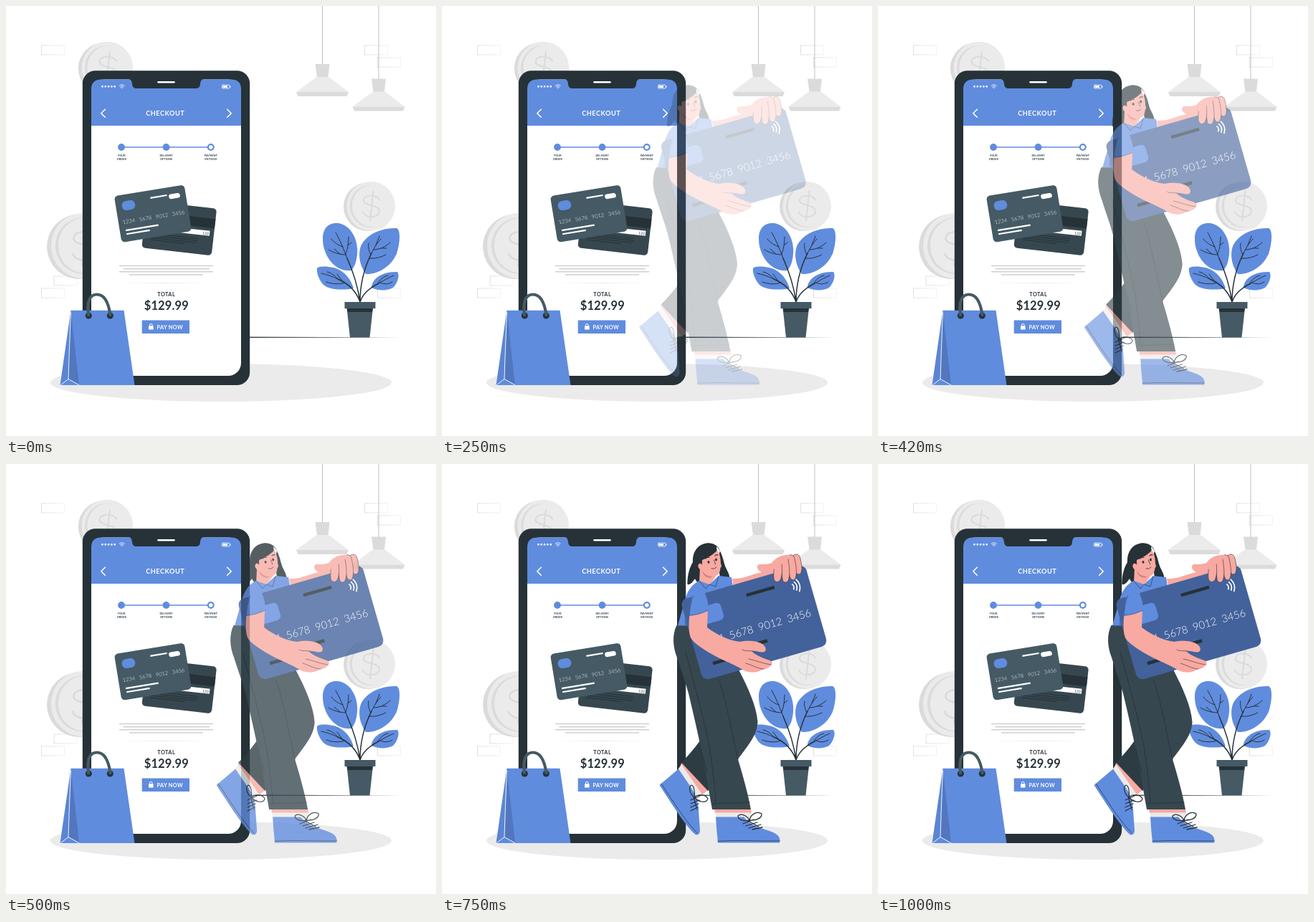
An HTML page for the animation above (1040 ms loop, 600x600 px).

```html
<!DOCTYPE html>
<html lang="en">
<head>
<meta charset="utf-8">
<title>Checkout</title>
<style>
  html, body { margin: 0; width: 100%; height: 100%; overflow: hidden; background: #fff; }
  svg { display: block; width: 100vw; height: 100vh; }
  text { font-family: Lato, sans-serif; }
  .mid { text-anchor: middle; }
  .b { font-weight: 700; }
  .blue { fill: #608cde; }
  .dark { fill: #263238; }
  .pants { fill: #37474f; }
  .slate { fill: #455a64; }
  .pale { fill: #ebebeb; }
  .grey { fill: #dbdbdb; }
  .white { fill: #fff; }
  .skin { fill: #f8a9a1; }
  .line { fill: none; stroke: #263238; stroke-linecap: round; stroke-linejoin: round; }
  .wline { fill: none; stroke: #fff; stroke-linecap: round; stroke-linejoin: round; }
  .label { font-size: 3.6px; letter-spacing: .2px; }
</style>
</head>
<body>
<svg viewBox="0 0 600 600" xmlns="http://www.w3.org/2000/svg">
  <defs>
    <linearGradient id="fade">
      <stop stop-color="#dcdcdc"/><stop offset="1" stop-color="#f2f2f2"/>
    </linearGradient>
    <rect id="brick" width="32" height="13" fill="none" stroke="url(#fade)" stroke-width=".9"/>
    <g id="coin">
      <ellipse class="grey" cx="-2" cy=".6" rx="34" ry="34"/>
      <ellipse class="pale" cx="2.2" cy="-.3" rx="33.8" ry="34.3"/>
      <ellipse class="grey" cx="1.8" cy="-.3" rx="29" ry="29.5"/>
      <ellipse class="pale" cx="3.8" cy="-.6" rx="28" ry="29"/>
      <path d="M14 -9C11 -17 -8 -17 -8 -8C-8 0 14 -3 14 7C14 16 -5 18 -9 8M5.5 -21L1 20"
        fill="none" stroke="#dbdbdb" stroke-width="2" stroke-linecap="round"/>
    </g>
    <g id="lamp">
      <path d="M441.5 -30V82" stroke="#c4c4c4" stroke-width="1.1"/>
      <path class="pale" d="M434 98.5H449.5L478 120H405Z"/>
      <path class="grey" d="M431.5 81H451.5L449.5 99H434ZM405 120H478L475.5 126H407.5Z"/>
    </g>
  </defs>

  <g id="room">
    <use href="#brick" x="49.5" y="55"/><use href="#brick" x="500.5" y="55"/>
    <use href="#brick" x="518.5" y="72"/><use href="#brick" x="67" y="377"/>
    <use href="#brick" x="49.5" y="394"/><use href="#brick" x="518.5" y="394"/>
    <use href="#coin" transform="translate(139 86.5) scale(1.06)"/>
    <use href="#coin" transform="translate(105 335) scale(1.33)"/>
    <use href="#coin" transform="translate(507 279.5)"/>
    <use href="#lamp"/><use href="#lamp" x="78.5" y="20.5"/>
    <ellipse class="pale" cx="300" cy="525.5" rx="238" ry="26.5"/>
    <path class="dark" d="M76 462.300L313 461.500L551 462.300L313 463.100Z"/>
  </g>

  <g id="plant">
    <path class="blue" d="M482 369C459 372 442 348 442 325C442 308 452 302 463 303C481 305 492 326 490 346C489 358 486 364 482 369Z
      M502 374C494 363 490 346 496 333C504 318 525 309 545 310C551 312 550 331 545 346C536 366 516 375 502 374Z
      M485 394C470 397 450 396 443 389C437 383 433 372 434 366C437 362 455 363 465 368C476 374 482 384 485 394Z
      M510 393C510 383 522 370 546 371C550 375 546 388 540 393C532 398 518 397 510 393Z"/>
    <path class="line" stroke-width="1.5" d="M494 413C491 392 485 372 476 352M494 413C494 390 500 365 510 345
      M494 413C488 396 477 387 463 381M494 413C498 401 508 393 520 387"/>
    <path class="line" stroke-width="1" d="M476 352C471 339 466 326 460 316M474 347C466 347 456 344 450 340M466 346L458 339
      M470 336C463 334 457 329 454 325M474 346C477 338 478 331 478 322M477 334L482 330
      M510 345C514 337 518 330 523 325M507 352C516 353 524 350 530 347M513 340C521 340 530 336 536 330M509 347C506 341 505 336 506 331M516 334C517 329 520 326 521 321M524 338L531 338
      M463 381C455 377 448 375 440 373M473 386C465 389 455 388 447 385M463 381C460 377 454 372 448 371M470 385L462 374
      M520 387C527 383 534 379 541 376M522 386C529 389 534 388 539 385M519 387C522 381 528 377 533 376"/>
    <path class="slate" d="M475.500 421H512L507.500 462.500H480Z"/>
    <path class="dark" d="M475.500 421H512L511 427H476.500Z"/>
    <rect class="slate" x="472.500" y="413" width="43" height="9"/>
  </g>

  <g id="phone">
    <rect class="dark" x="106.800" y="90.200" width="233.400" height="438.800" rx="18"/>
    <rect class="white" x="119" y="102.500" width="209" height="413.500" rx="18"/>
    <path class="blue" d="M119 167V116Q119 102.500 133 102.500H314Q328 102.500 328 116V167Z"/>
    <path class="dark" d="M171 102C175 102.500 175.500 105 176 109Q176.500 115 182 115H265Q270.500 115 271 109C271.500 105 272 102.500 276 102Z"/>
    <path class="wline" stroke-width="2.500" d="M212.500 106.200H234.500"/>
    <path class="wline" stroke-width="2.800" d="M134.500 112.300h0M138.800 112.300h0M143.100 112.300h0M147.400 112.300h0M151.700 112.300h0"/>
    <path class="wline" stroke-width=".9" d="M158.200 111.200Q161.700 108.300 165.200 111.200M159.600 112.900Q161.700 111.100 163.800 112.900M161.300 114.300h.8"/>
    <rect class="wline" x="301.500" y="110.200" width="10.500" height="4.800" rx="1" stroke-width=".8"/>
    <path class="white" d="M302.500 111.200h6.500v2.800h-6.500zM312.400 111.500h1v2.200h-1z"/>
    <path class="wline" stroke-width="1.600" d="M138.300 144.200L132.800 149.700L138.300 155.200M308.700 144.200L314.200 149.700L308.700 155.200"/>
    <text class="white b mid" x="222.200" y="153" font-size="9.200" letter-spacing=".5">CHECKOUT</text>

    <path d="M161 197H282" stroke="#608cde" stroke-width="1.300"/>
    <circle class="blue" cx="161" cy="197" r="4.900"/><circle class="blue" cx="223.500" cy="197" r="4.900"/>
    <circle cx="285.800" cy="197" r="3.900" fill="#fff" stroke="#608cde" stroke-width="2.200"/>
    <g class="label dark b mid">
      <text x="161.300" y="210.100">YOUR</text><text x="161.300" y="214.700">ORDER</text>
      <text x="223.600" y="210.100">DELIVERY</text><text x="223.600" y="214.700">OPTIONS</text>
      <text x="285.900" y="210.100">PAYMENT</text><text x="285.900" y="214.700">METHOD</text>
    </g>

    <g transform="translate(241.700 310) rotate(6.500)">
      <rect class="pants" x="-49" y="-33" width="98" height="66" rx="5"/>
      <path class="dark" d="M-49 -18.500H49V-5H-49Z"/>
      <path class="white" d="M-30 -1H43V6H-30Z"/>
      <text class="dark mid" x="37.500" y="4.800" font-size="5">123</text>
      <path class="line" stroke-width="1" d="M-38 11.500H27M-38 14.500H27M-38 17.500H25M-38 20.500H10"/>
    </g>
    <g transform="translate(205 289.700) rotate(-9.300)">
      <rect class="slate" x="-49.500" y="-32.700" width="99" height="65.400" rx="5"/>
      <rect class="blue" x="-41" y="-23.500" width="18.600" height="13" rx="6"/>
      <rect class="white" x="25.800" y="-22.800" width="15.600" height="6.700" rx="3"/>
      <path d="M0 -22.200H23.500M-41.300 17H5M-41 22.200H-8" stroke="#fff" stroke-width="2.200"/>
      <text class="white mid" x=".2" y="7.600" font-size="7.400" font-weight="300" letter-spacing=".1" word-spacing="3.700">1234 5678 9012 3456</text>
    </g>

    <path d="M158 362.500H289M163.500 366.700H284M158 370.800H289M172 375H275" stroke="#cfcfcf" stroke-width="1.400"/>
    <path class="pale" d="M157 386.500L223 386L289 386.500L223 387Z"/>
    <text class="dark b mid" x="223.700" y="404.500" font-size="7.300" letter-spacing=".45">TOTAL</text>
    <text class="dark b mid" x="223.800" y="423.800" font-size="16.500" letter-spacing=".1">$129.99</text>
    <rect class="blue" x="189.700" y="438.500" width="66.300" height="18.500"/>
    <rect class="white" x="199" y="446.300" width="6.600" height="5.300" rx=".7"/>
    <path class="wline" stroke-width="1" d="M200.500 446.500V445.200A1.800 1.800 0 0 1 204.100 445.200V446.500"/>
    <text class="white b mid" x="228.800" y="450.700" font-size="7.300" letter-spacing=".35">PAY NOW</text>
  </g>

  <g id="bag">
    <path class="blue" d="M90.500 424.700H164.500L179.500 529H75.500Z"/>
    <path d="M90.500 424.700L102 528.500L87 520.500L75.500 529Z" opacity=".05"/>
    <path d="M90.500 424.700L102 528.500L87 520.500Z" opacity=".1"/>
    <path class="wline" stroke-width=".9" d="M90.500 428C89 460 88 490 87 520.500M76.500 528.500L87 520.500L101.500 528.500"/>
    <circle class="dark" cx="115.300" cy="432" r="4.500"/><circle class="dark" cx="145.300" cy="432" r="4.500"/>
    <path d="M115 431C112 407 120 402.500 127 402.500C138 402.500 143 414 145.500 431" fill="none" stroke="#455a64" stroke-width="4.200" stroke-linecap="round"/>
  </g>

  <g id="shopper" opacity="0">
    <g id="back-foot">
      <path class="skin" d="M331 419L336 414L371 454L360 462Z"/>
      <path class="pale" d="M327.500 426L332 419L361 461L352 464Z"/>
      <path class="blue" d="M301.500 448L328 425.500C336 438 345 449 350 459C355 468 356 478 356.500 490L358 511C358 516 355 518.500 351.500 517C340 507 326 486 301.500 448Z"/>
      <path class="line" stroke-width=".7" d="M304 446C320 470 336 496 354 515"/>
      <path class="line" stroke-width="1.200" d="M350 465C343 460 342 450 346 448C350 449 351 458 350 465C356 460 366 461 369 467C367 474 356 472 350 465
        M345 469L358 463M345 474L357 469M345 479L356 474M345 484L355 479M349 464L354 482"/>
    </g>
    <path d="M358 386L412 411L369 456L332 416.500C341 408 351 396 358 386Z" fill="#2d3b42"/>
    <path class="pants" d="M376 285L412 287C425 312 437 338 438.500 360C438 378 425 393 411.500 411L395 380Z"/>
    <path class="skin" d="M378 481H429L430 487H379Z"/>
    <path class="pale" d="M379.500 486.500H429L428 494H380Z"/>
    <path class="pants" d="M325.500 225C319 238 320 255 326 270C331 286 338 305 342 320C348 345 355 375 360 400C366 430 371 460 375 482H429C425 460 418 435 411 412C404 370 397 325 390 285L356 225Z"/>
    <path class="line" stroke-width=".8" d="M338 262C347 298 363 350 372 400C376 430 379 450 380 472M376 474C394 472 412 474 427 472M385 302C396 335 402 375 411 412M360 398C362 408 365 418 368 430"/>
    <g id="front-foot">
      <path class="blue" d="M380 492.500H419C424 498 430 503 437 506C450 511 463 513 468 520Q470.500 525 469 528.500H383Q381 510 380 492.500Z"/>
      <path class="line" stroke-width=".7" d="M383 526.300C412 524.500 440 526.500 469 526"/>
      <path class="line" stroke-width="1.300" d="M427 497C418 499 411 496 411 491C415 487 423 490 427 497C429 488 438 484 444 488C445 494 436 498 427 497
        M418 502L433 496M422 505L438 500M426 508L443 503M431 510L445 507M425 498L440 506"/>
    </g>

    <g id="head">
      <path class="dark" d="M348 137C343 145 340 157 340.500 168C345 169 348 164 351 160C352 163 355 166 358 167L366 160L378 150L386 121C383 113 375 109.500 367 110.500C355 112 347 123 348 137Z
        M381 115C387 120 390 131 392 139C394 147 399 151 399.500 160L395 158L386 160Z"/>
      <path class="skin" d="M358 145L357 165L371 169L380 157L378 150Z"/>
      <path class="skin" d="M361 134C369 131 377 126 382 120.500C385.500 124 387 132 387 139C388.500 142 388 144 386.500 145C386 152 383 157 376 157C369 157 363 153 360.500 147.500C356 148 353.500 141 357 139C359 138 360.500 139.500 361 141Z"/>
      <path d="M361 149C365 155 370 157 376 157C371 161 363 158 361 149Z" fill="#db8079"/>
      <path class="line" stroke-width="1.100" d="M366 132Q368 129 371 130.500M379 128Q381 126 383 127"/>
      <ellipse class="dark" cx="370" cy="136.800" rx="1.500" ry="1.900"/><ellipse class="dark" cx="380.500" cy="133.500" rx="1.400" ry="1.900"/>
      <path class="line" stroke-width=".8" d="M377.500 134C378 138 381 139 379 140.500M374 146Q378 147.500 381 144"/>
    </g>

    <path class="blue" d="M357 163C346 168 340 178 337 190L327 225.500H357L395 178L404 171L402 158L384 156L371 168Z"/>
    <path d="M346 186C339 198 336 211 337 225H357L360 195Z" fill="#496db3"/>
    <path class="line" stroke-width=".6" d="M357 163L366 174L371 168L380 171L384 157"/>
    <path class="skin" d="M403 160C418 161 430 154 444 151C438 148 436 143 440 140C448 140 455 140 460 137C466 130 474 127 482 128L492 127L495 145L468 154L405 171Z"/>

    <g transform="translate(433.400 221.200) rotate(-16)">
      <rect x="-90.500" y="-58.500" width="181" height="117" rx="9" fill="#43629b"/>
      <rect class="blue" x="-78" y="-41" width="40" height="25" rx="6"/>
      <path d="M.3 -39.500H41M-35 29.500H11M-71 39H-20" stroke="#263238" stroke-width="4.500"/>
      <path class="wline" stroke-width="1.700" d="M66 -36.500Q68.500 -33 66 -29.500M69.500 -39Q73.500 -33 69.500 -27M73 -41.500Q78.500 -33 73 -24.500"/>
      <text class="white mid" y="13.400" font-size="14.800" font-weight="300" word-spacing="3.600">1234 5678 9012 3456</text>
    </g>

    <g id="fingers" class="skin" stroke="#263238" stroke-width=".6">
      <path d="M488 128C492 124 497 126 498 132C500 140 501 147 499 152C496 156 492 153 491 149Z"/>
      <path d="M479 130C483 125 489 126 490 132C492 142 494 152 491 160C488 164 484 161 483 156Z"/>
      <path d="M470 133C474 127 480 127 481 133C483 145 484 156 481 163C478 167 473 165 473 160Z"/>
      <path d="M461 139C465 132 471 131 472 138C473 148 473 156 470 162C467 166 462 165 461 160C460 154 462 146 461 139Z"/>
    </g>
    <path class="skin" d="M459 137C464 130 474 126 484 127L480 134L466 144L459 148Z"/>

    <path class="skin" d="M343.500 209C342 224 342 238 346 244C351 251 364 260 385 271C398 277 408 281 416 286C424 292 437 292 445 287C451 286 455 284 457 281C460 278 459 275 454 273.500C446 271 436 267 430 261C436 260 442 264 448 262C452 259 449 253 443 250C434 246 425 246 413 248C398 246 381 238 368 228L369 204Z"/>
    <path class="line" stroke-width=".6" d="M417 259C421 262 427 260 431 261M426 272C436 274 447 279 457 280M422 278C431 281 440 286 447 286"/>
    <path class="blue" d="M358 165C348 173 345 190 343 212C352 211 362 208 370 204C370 196 368 188 365 180Z"/>
    <path d="M349 183C345 193 344 202 343 211C352 211 361 208 370 204" fill="none" stroke="#3d5b98" stroke-width=".8"/>
  </g>
</svg>
<script>
  const LOOP = 1040, STEP = 1000 / 24, LEAD = 20;
  const slide = document.getElementById("shopper").animate(
    [
      { transform: "translateX(-36px)", opacity: 0 },
      { transform: "translateX(0px)", opacity: 1 }
    ],
    { duration: 1000, easing: "cubic-bezier(.36,-.01,.5,1.38)", fill: "both" }
  );
  slide.pause();

  const start = performance.now();
  function draw() {
    const t = (performance.now() - start) % LOOP;
    // The slide advances at 24 steps per second.
    const step = Math.floor((t + 5) / STEP);
    slide.currentTime = Math.min(1000, step * STEP + LEAD);
    requestAnimationFrame(draw);
  }
  draw();
</script>
</body>
</html>
```
